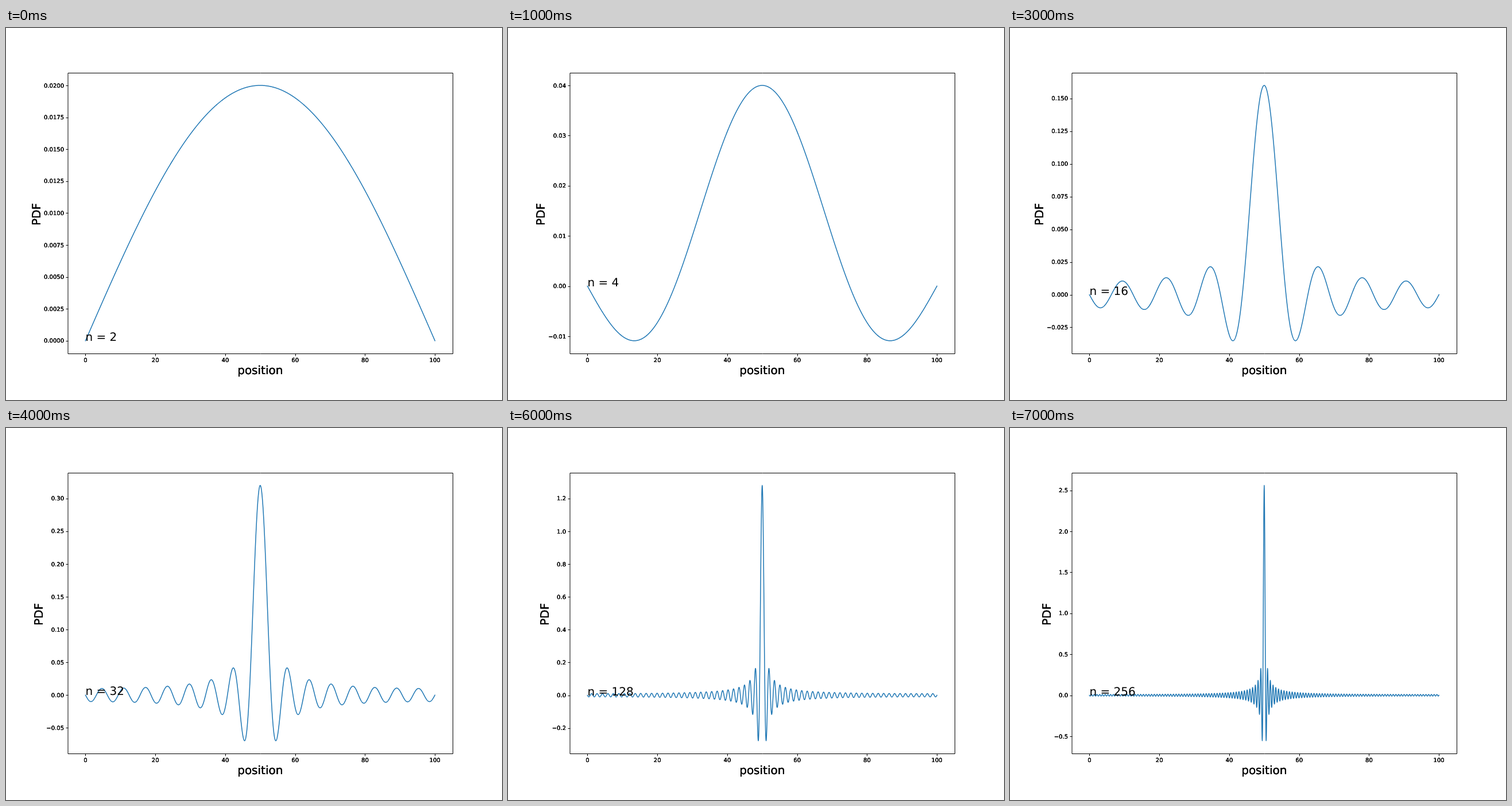
Recreate the animation shown at these times as an HTML page with a canvas. Size 864x648 px, loop 8 s.

```html
<!DOCTYPE html>
<html>
<head>
<meta charset="utf-8">
<style>
  html, body { margin: 0; width: 100%; height: 100%; overflow: hidden; background: #fff; }
  canvas { display: block; }
</style>
</head>
<body>
<canvas id="stage" width="864" height="648"></canvas>
<script>
const ctx = document.getElementById('stage').getContext('2d');
const box = { left: 108, right: 777.6, top: 77.76, bottom: 567 };
const margin = 0.05 / 1.1;
const samples = 2000;

// Tick spacing and decimals for n = 2, 4, 8, ... 256
const yTicks = [[0.0025, 4], [0.01, 2], [0.02, 2], [0.025, 3], [0.05, 2], [0.1, 1], [0.2, 1], [0.5, 1]];

const snap = v => Math.floor(v + 0.5);
const lerp = (a, b, t) => a + (b - a) * t;
const xAt = x => lerp(box.left, box.right, margin + (1 - 2 * margin) * x / 100);

// Partial sum of the delta series: 0.02 * sum of cos(k * theta) over odd k < n
function pdf(n, x) {
  const theta = Math.PI * (x - 50) / 100;
  return 0.01 * (Math.abs(theta) < 1e-9 ? n : Math.sin(n * theta) / Math.sin(theta));
}

function text(string, x, y, size, align, passes = 1) {
  ctx.font = `${size}px "DejaVu Sans", sans-serif`;
  ctx.textAlign = align;
  for (let i = 0; i < passes; i++) ctx.fillText(string, x, y);
}

function draw(step) {
  const n = 2 ** (step + 1);
  const [spacing, decimals] = yTicks[step];
  const xs = Array.from({ length: samples + 1 }, (_, i) => 100 * i / samples);
  const ys = xs.map(x => pdf(n, x));
  const low = Math.min(...ys), high = Math.max(...ys);
  const yAt = y => lerp(box.bottom, box.top, margin + (1 - 2 * margin) * (y - low) / (high - low));

  ctx.fillStyle = '#fff';
  ctx.fillRect(0, 0, 864, 648);
  ctx.textRendering = 'geometricPrecision';

  ctx.beginPath();
  xs.forEach((x, i) => ctx.lineTo(xAt(x), yAt(ys[i])));
  ctx.strokeStyle = '#1f77b4';
  ctx.lineWidth = 1.5;
  ctx.lineJoin = 'round';
  ctx.lineCap = 'square';
  ctx.stroke();

  ctx.fillStyle = ctx.strokeStyle = '#000';
  ctx.lineWidth = 1;
  ctx.strokeRect(108.5, 78.5, 670, 489);

  for (let x = 0; x <= 100; x += 20) {
    ctx.fillRect(snap(xAt(x)), 567, 1, 4.5);
    text(x, xAt(x), 582, 10, 'center', 3);
  }

  let labelWidth = 0;
  const first = Math.ceil(low / spacing - 0.4 * (high - low) * 0.1 / spacing);
  for (let k = first; yAt(k * spacing) >= box.top; k++) {
    const y = yAt(k * spacing);
    if (y > box.bottom) continue;
    const label = (k * spacing).toFixed(decimals).replace('-', '\u2212');
    ctx.fillRect(104.5, snap(y), 4, 1);
    text(label, 101, snap(y + 3.6), 10, 'right', 3);
    labelWidth = Math.max(labelWidth, ctx.measureText(label).width);
  }

  text('position', 442.8, 603, 20, 'center', 3);
  ctx.save();
  ctx.translate(Math.round(95 - labelWidth), 324.5);
  ctx.rotate(-Math.PI / 2);
  text('PDF', 0, 0, 20, 'center', 3);
  ctx.restore();
  text('n = ' + n, xAt(0), snap(yAt(0)), 20, 'left');
}

const start = performance.now();
let shown = -1;
function tick() {
  const step = Math.floor((performance.now() - start) / 1000) % yTicks.length;
  if (step !== shown) draw(shown = step);
  requestAnimationFrame(tick);
}
tick();
</script>
</body>
</html>
```
